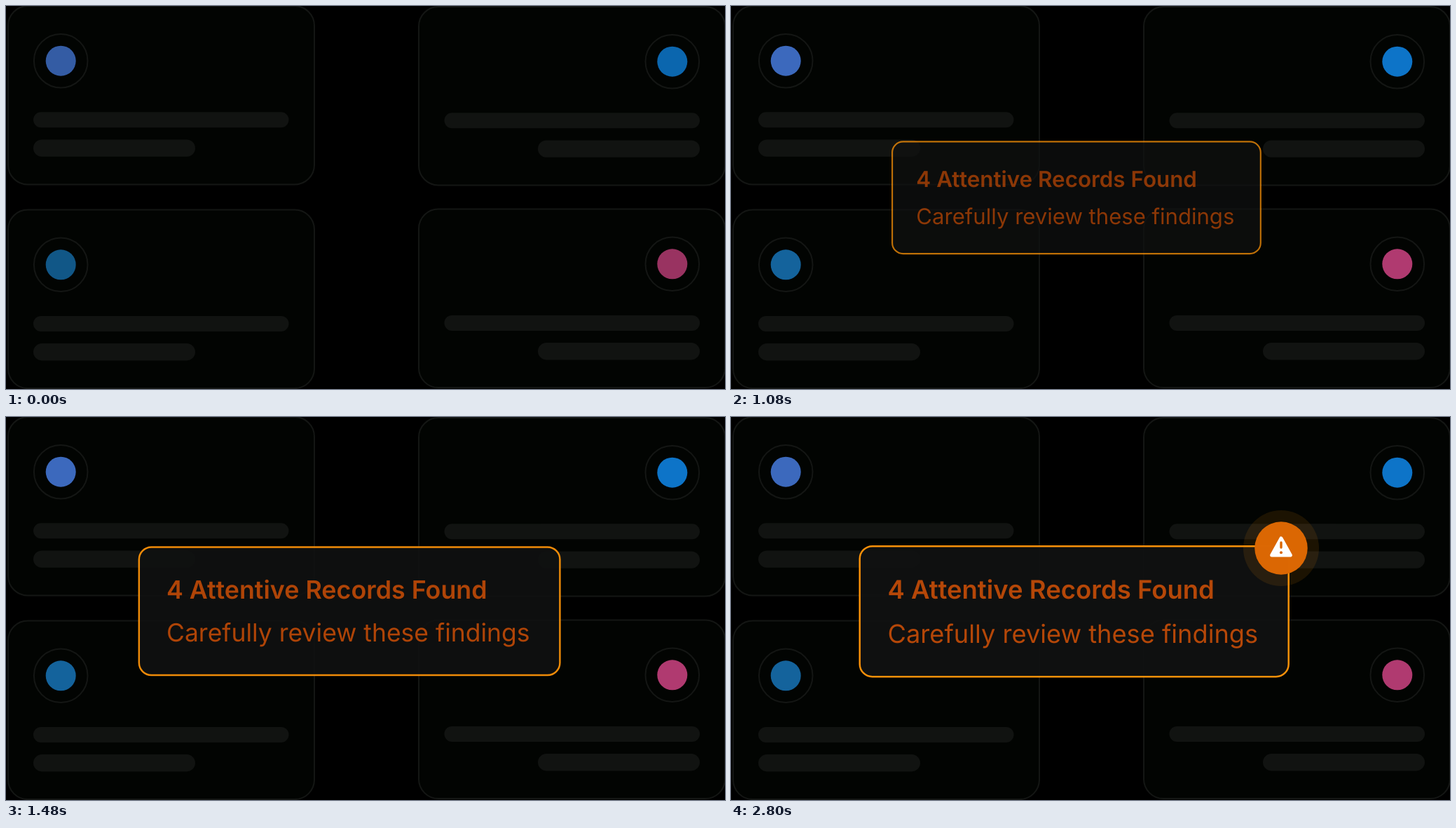
An HTML page that plays this animation: 1026x546 px, repeating every 2.88 s.

```html
<!DOCTYPE html>
<html lang="en">
<head>
<meta charset="utf-8">
<title>Records alert</title>
<style>
  html, body { margin: 0; width: 100%; height: 100%; overflow: hidden; background: #000; }
  svg { display: block; width: 100vw; height: 100vh; }
  text { font-family: Inter, "Liberation Sans", sans-serif; fill: #b54708; text-rendering: geometricPrecision; }
</style>
</head>
<body>
<svg viewBox="0 0 1026 546">
  <g id="cards"></g>
  <g id="popup">
    <rect x="183.7" y="184.2" width="612" height="186" rx="18" fill="#101111" fill-opacity=".95" stroke="#f79009" stroke-width="2.5"/>
    <text x="223.6" y="259" font-size="36.5" font-weight="600">4 Attentive Records Found</text>
    <text x="223.6" y="321.5" font-size="36.2">Carefully review these findings</text>
  </g>
  <g id="badge">
    <circle cx="785" cy="187" r="54" fill="#f79009" fill-opacity=".11"/>
    <circle cx="785" cy="187" r="37.7" fill="#dc6803"/>
    <path d="M785 173L798.3 197H771.7Z" fill="#fff" stroke="#fff" stroke-width="5" stroke-linejoin="round"/>
    <path d="M785 179V186" stroke="#dc6803" stroke-width="3.4" stroke-linecap="round"/>
    <circle cx="785" cy="193.2" r="2" fill="#dc6803"/>
  </g>
</svg>
<script>
  const LOOP = 2880, STEP = 40;
  const NS = "http://www.w3.org/2000/svg";
  const $ = id => document.getElementById(id);
  const clamp = v => Math.min(1, Math.max(0, v));

  function add(parent, tag, attrs) {
    const el = document.createElementNS(NS, tag);
    for (const key in attrs) el.setAttribute(key, attrs[key]);
    return parent.appendChild(el);
  }

  // One placeholder card; right-hand cards align their content to the right edge.
  function card(x, y, color, right) {
    const g = add($("cards"), "g", { transform: `translate(${x} ${y})` });
    const line = { stroke: "#141614", "stroke-width": 2 };
    const bar = (top, width, height) => add(g, "rect", {
      x: right ? 401 - width : 36, y: top, width, height, rx: height / 2, fill: "#111311"
    });
    const cx = right ? 361.8 : 75.2;
    add(g, "rect", { x: 0, y: 0, width: 437, height: 254.5, rx: 28, fill: "#020402", ...line });
    add(g, "circle", { cx, cy: 78.2, r: 38.3, fill: "none", ...line });
    bar(151.3, 364.5, 22);
    bar(190.5, 231, 24.3);
    return add(g, "circle", { cx, cy: 78.2, r: 21.5, fill: color });
  }

  const dots = [
    card(3, 0, "#3c69bd"),
    card(589, 1, "#0d74c8", true),
    card(3, 290.6, "#14639c"),
    card(589, 289.6, "#b03a70", true)
  ];

  function place(el, cx, cy, dx, dy, scale, opacity) {
    el.setAttribute("transform",
      `translate(${cx + dx} ${cy + dy}) scale(${scale}) translate(${-cx} ${-cy})`);
    el.setAttribute("opacity", clamp(opacity));
  }

  function draw(t) {
    const glow = 0.87 + 0.13 * clamp((t - 200) / 520);
    dots.forEach(dot => dot.setAttribute("opacity", glow));

    // Both parts settle as their remaining distance shrinks to zero.
    const grow = clamp((2088 - t) / 1645) ** 4;
    place($("popup"), 489.7, 277.2, 23 * grow, -28 * grow, 1 - grow, t < 840 ? 0 : 1 - 1.6 * grow);

    const drop = 0.41 * Math.exp((1920 - Math.max(t, 1920)) / 148);
    place($("badge"), 785, 187, 0, 0, 1 + drop, t < 1920 ? 0 : 1 - 2 * drop);
  }

  const start = performance.now();
  function tick() {
    const t = (performance.now() - start) % LOOP;
    draw(Math.floor(t / STEP) * STEP);
    requestAnimationFrame(tick);
  }
  tick();
</script>
</body>
</html>
```
